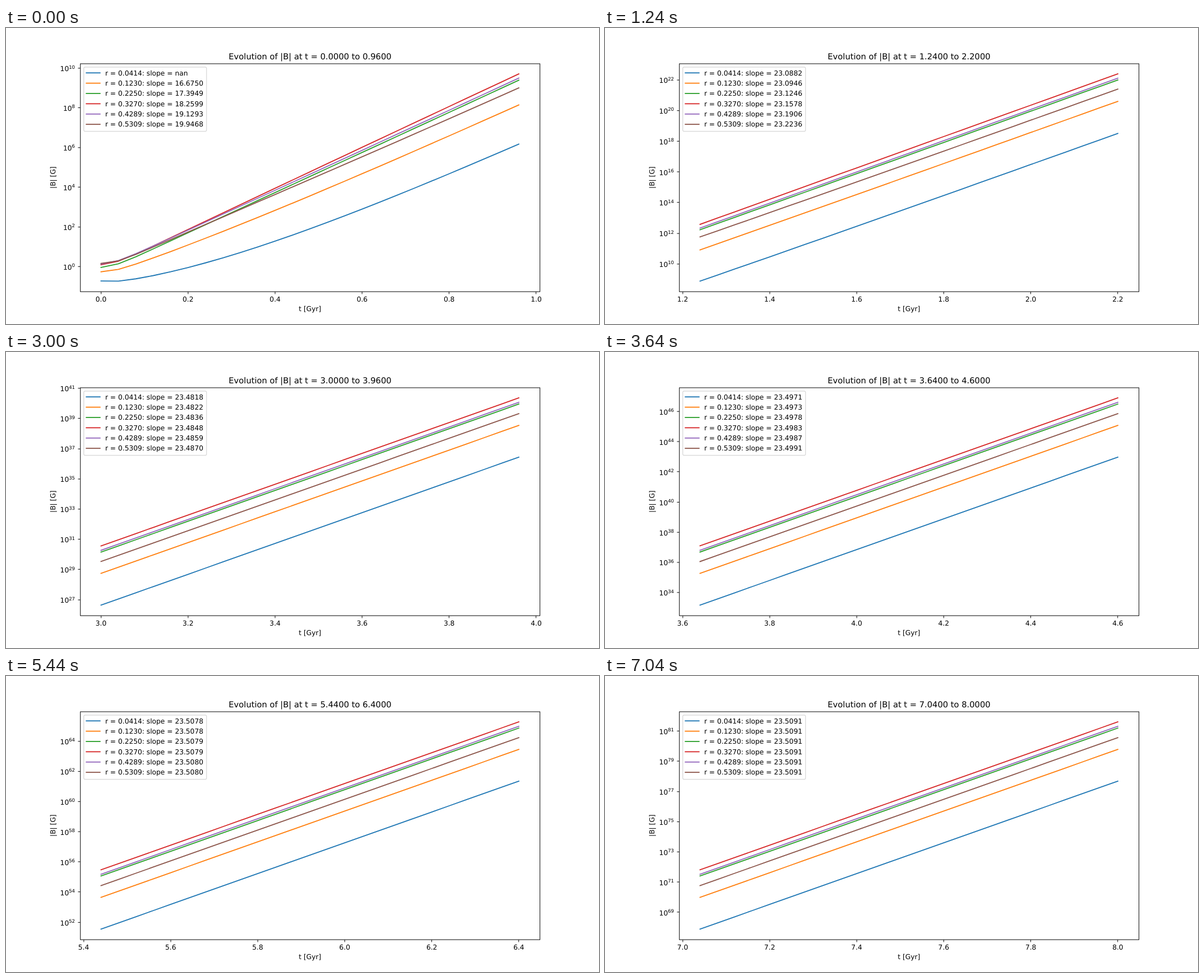
Write an HTML page that moves like this. It is 1058x529 px and loops after 7080 ms.

```html
<!DOCTYPE html>
<html lang="en">
<head>
<meta charset="utf-8">
<title>Evolution of |B|</title>
<style>
  html, body { margin: 0; width: 100%; height: 100%; overflow: hidden; background: #fff; }
  svg { display: block; width: 100vw; height: 100vh; }
  text { font: 13.889px "DejaVu Sans", sans-serif; text-rendering: geometricPrecision; white-space: pre; }
  .title { font-size: 16.667px; }
  .sup { font-size: 9.722px; }
  .mid { text-anchor: middle; }
  .end { text-anchor: end; }
  .axis { fill: none; stroke: #000; stroke-width: 1.111; }
  .line { fill: none; stroke-width: 2.083; stroke-linecap: square; stroke-linejoin: round; }
</style>
</head>
<body>
<svg viewBox="0 0 1200 600">
  <g id="plot"></g>
  <rect class="axis" x="150.5" y="72.5" width="930" height="462"/>
  <text class="mid" x="615" y="573.9">t [Gyr]</text>
  <text class="mid" transform="translate(99.6 303) rotate(-90)">|B| [G]</text>
  <rect x="157.4" y="79.2" width="248.4" height="130.2" rx="2.8" fill="#fff" fill-opacity=".8" stroke="#d6d6d6" stroke-width="1.39"/>
  <g id="legend"></g>
</svg>
<script>
const STEP_MS = 40, STEPS = 177, DT = 0.04, POINTS = 25;
const BOX = { left: 150, right: 1080, top: 72, bottom: 534 };
const MARGIN = 0.05;
const FINAL_SLOPE = 23.5094;  // natural-log growth per Gyr
const DECADES = 10.21;        // the same growth in powers of ten

// base: late offset of log10|B|; slow, fast, kick: decaying modes; slope: fitted slope at t = 0
const series = [
  { r: "0.0414", color: "#1f77b4", base: -3.995, slow: 1.32, fast: 1.8, kick: .15, slope: 16.5294 },
  { r: "0.1230", color: "#ff7f0e", base: -1.892, slow: 1.02, fast: .38, kick: .23, slope: 16.6750 },
  { r: "0.2250", color: "#2ca02c", base: -.477, slow: .36, fast: -.23, kick: .31, slope: 17.3949 },
  { r: "0.3270", color: "#d62728", base: -.067, slow: -.1, fast: -.06, kick: .32, slope: 18.2599 },
  { r: "0.4289", color: "#9467bd", base: -.362, slow: .29, fast: -.1, kick: .3, slope: 19.1293 },
  { r: "0.5309", color: "#8c564b", base: -1.112, slow: 1.62, fast: -.69, kick: .345, slope: 19.9468 },
];

// log10|B|: steady exponential growth plus modes that die out
function level(s, t) {
  return DECADES * t + s.base
    + s.slow * Math.exp(-1.6 * t) + s.fast * Math.exp(-3.2 * t) + s.kick * Math.exp(-35 * t);
}

// The gap to the final slope closes at a rate that itself relaxes to a constant.
function slopeAt(s, t) {
  const gap = FINAL_SLOPE - s.slope;
  const extraRate = 1.804 - 0.0153 * (8.31 - gap) ** 2;
  return FINAL_SLOPE - gap * Math.exp(-0.98 * t - extraRate * 1.8 * (1 - Math.exp(-t / 1.8)));
}

const plot = document.getElementById("plot");
const legend = document.getElementById("legend");
const snap = v => Math.floor(v) + 0.5;
const text = (x, y, value, cls = "") => `<text class="${cls}" x="${x}" y="${y}">${value}</text>`;
const tick = d => `<path class="axis" d="${d}"/>`;
const line = (points, color) => `<polyline class="line" stroke="${color}" points="${points}"/>`;

// Axis mapping with the data inset by the margin on both ends.
function scale(min, max, from, to) {
  const pad = (max - min) * MARGIN, low = min - pad, high = max + pad;
  return { low, high, at: v => from + (v - low) / (high - low) * (to - from) };
}

legend.innerHTML = series.map((s, i) => {
  const y = 91 + i * 20.85;
  return line(`162.5,${y} 190.3,${y}`, s.color) + text(200.7, y + 4.9, "");
}).join("");
const labels = [...legend.querySelectorAll("text")];

function draw(step) {
  const times = Array.from({ length: POINTS }, (_, i) => (step + i) * DT);
  const start = times[0], end = times[POINTS - 1];
  const levels = series.map(s => times.map(t => level(s, t)));
  const all = levels.flat();
  const x = scale(start, end, BOX.left, BOX.right);
  const y = scale(Math.min(...all), Math.max(...all), BOX.bottom, BOX.top);

  let out = text(615.3, 63.67, `Evolution of |B| at t = ${start.toFixed(4)} to ${end.toFixed(4)}`, "title mid");

  for (let i = Math.ceil(x.low * 5); i <= x.high * 5; i++) {
    const px = x.at(i / 5);
    out += tick(`M${snap(px)} 534.5v4.86`) + text(px, 554.5, (i / 5).toFixed(1), "mid");
  }

  for (let n = Math.floor(y.low); n <= y.high; n += 2) {
    if (n < y.low) continue;
    const py = y.at(n), left = 139.6 - 6.186 * String(n).length;
    out += tick(`M150.5 ${snap(py)}h-4.86`)
      + text(left, py + 6.2, "10", "end")
      + text(left, py + 0.9, n, "sup");
  }

  series.forEach((s, i) => {
    const points = times.map((t, j) => `${x.at(t).toFixed(2)},${y.at(levels[i][j]).toFixed(2)}`);
    out += line(points.join(" "), s.color);
    const slope = step === 0 && i === 0 ? "nan" : slopeAt(s, start).toFixed(4);
    labels[i].textContent = `r = ${s.r}: slope = ${slope}`;
  });
  plot.innerHTML = out;
}

const origin = performance.now();
let shown = -1;
function play() {
  const step = Math.floor((performance.now() - origin) / STEP_MS) % STEPS;
  if (step !== shown) draw(shown = step);
  requestAnimationFrame(play);
}
play();
</script>
</body>
</html>
```
